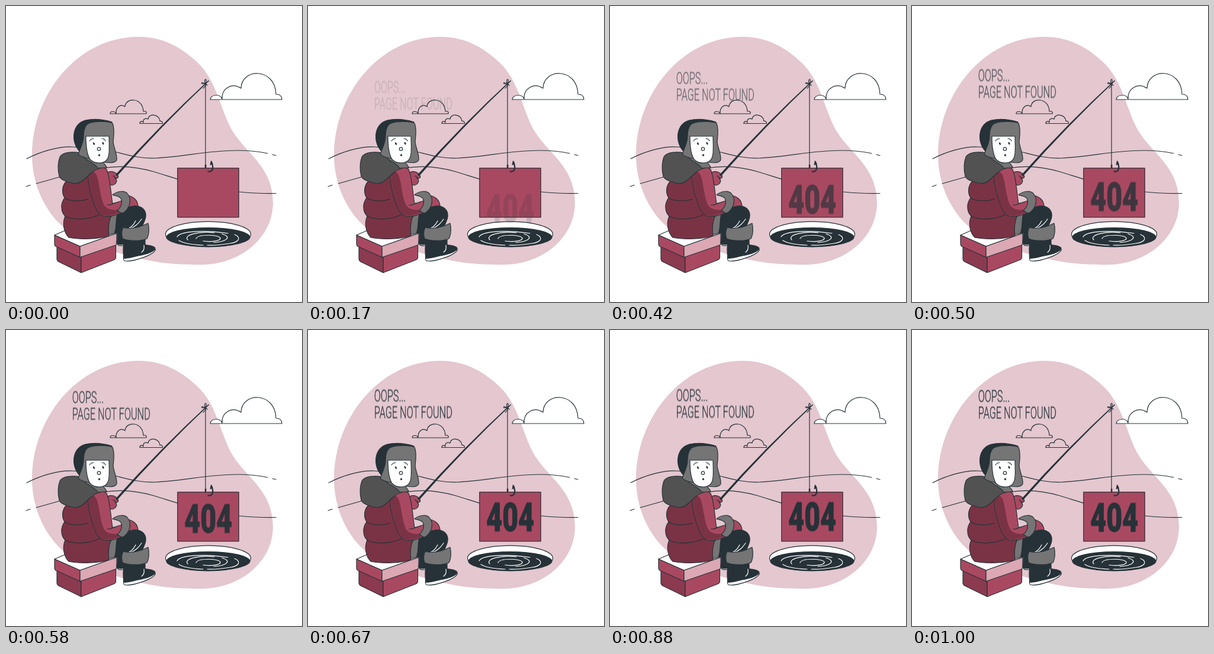
Recreate the animation shown at these times as an HTML page. Size 500 by 500 pixels, loop 1040 ms.

```html
<!DOCTYPE html>
<html lang="en">
<head>
<meta charset="utf-8">
<title>Page not found</title>
<style>
  html, body { margin: 0; width: 100%; height: 100%; overflow: hidden; background: #fff; }
  svg { display: block; width: 100%; height: 100%; }

  :root {
    --ink: #263238;
    --rose: #a94961;
    --wine: #7a3345;
    --blush: #e4c7cf;
    --grey: #757575;
  }

  .line { fill: none; stroke: var(--ink); stroke-width: 1.2; stroke-linecap: round; stroke-linejoin: round; }
  .shape { stroke: var(--ink); stroke-width: 1.2; stroke-linejoin: round; }
  .hook { stroke-width: 2.3; }
  .chalk { fill: none; stroke: #fff; stroke-width: 1.2; stroke-linecap: round; }
  .ink { fill: var(--ink); }
  .rose { fill: var(--rose); }
  .wine { fill: var(--wine); }
  .blush { fill: var(--blush); }
  .grey { fill: var(--grey); }
  .white { fill: #fff; }

  text { font-family: Roboto, "Liberation Sans", sans-serif; fill: var(--ink); stroke: var(--ink); }
  .message { font-size: 27.7px; font-weight: 300; stroke-width: .3; }
  .code { font-size: 67.5px; font-weight: 900; text-anchor: middle; stroke-width: 1; }

  .rise { animation: rise 1040ms infinite; }
  @keyframes rise {
    0% {
      opacity: 0;
      transform: translateY(29.9px);
      animation-timing-function: cubic-bezier(.345, .085, .499, 1.368);
    }
    92.3%, 100% { opacity: 1; transform: none; }
  }
</style>
</head>
<body>
<svg viewBox="0 0 500 500" role="img" aria-label="Ice fisher who has caught a 404 sign">
  <path class="blush" d="M224 52C268 52 300 73 324 96C354 125 360 165 378 203C400 247 451 268 451 332
    C451 392 395 437 330 437C285 437 255 434 225 426C170 412 120 400 85 362C57 330 44 290 44 252C44 150 120 52 224 52Z"/>

  <!-- hills -->
  <g class="line">
    <path d="M35 258C58 246 88 237 112 238C140 239 165 243 187 247C207 252 228 258 252 257C300 255 340 244 390 244C410 244 428 246 442 249M450 251L456 252.5"/>
    <path d="M34 305L41 302.5M51 300L90 289M164 274C196 268 226 273 250 280C290 292 335 309 394 314C415 316 436 317 456 316.5"/>
  </g>

  <!-- clouds -->
  <path class="shape white" d="M345 158C346 149 362 148 365 157C364 140 381 128 397 139C398 104 455 104 456 149C463 149 466 153 466 158Z"/>
  <g class="line">
    <path d="M176 182C176 177 184 177 186 182C185 172 193 164 201 170C202 154 231 154 232 178C236 177 238 179 237 182Z"/>
    <path d="M226 198.500C226 194 231 194 232 197C231 191 235 189 240 191C241 181 259 182 260 194.500C263 194 265 196 264.500 198.500Z"/>
  </g>

  <!-- ice hole -->
  <ellipse class="shape white" cx="341.500" cy="385.500" rx="72" ry="21.300"/>
  <ellipse class="ink" cx="341.500" cy="390.500" rx="71" ry="16.500"/>
  <g class="chalk">
    <path d="M289 390C293 382 325 377 375 384M386 386C398 391 394 399 378 401C367 403 354 404.500 340 404M333 404C311 403 298 400 292 396"/>
    <path d="M307 395C299 387 325 380 352 383M365 385C382 390 373 398 351 399.500"/>
    <path d="M321 393C324 385 360 386 362 392C363 397 346 399 333 397"/>
  </g>

  <!-- sign, line and hook -->
  <rect class="shape rose" x="289.800" y="273.800" width="103.400" height="83"/>
  <path class="line" d="M337 132V270"/>
  <path class="ink" d="M335.800 268H338.400V274H335.800Z"/>
  <path class="line hook" d="M347 263L348.500 268C351 276 347 281 341.500 279.500"/>
  <path class="ink" d="M346 261L350 267L344.500 269Z"/>

  <!-- box -->
  <path class="shape" fill="#8b3a50" d="M86 405L127 424V450.500L89 432Q86 430 86 427Z"/>
  <path class="shape rose" d="M127 423L185.500 401V425Q185 428 182 429L127 450.500Z"/>
  <path class="shape white" d="M82 387L125 406L187 384L130 366Z"/>
  <path class="shape rose" d="M82 387L125 406V424.500L84 406Q82 405 82 402Z"/>
  <path class="shape" fill="#dba8b4" d="M125 406L187 384V401Q187 403 185 404L125 424.500Z"/>

  <!-- far leg -->
  <path class="shape white" d="M187 400C189 406 195 406 202 403V397H187Z"/>
  <path class="ink" d="M188 374H204V402C196 404 189 404 187 401Z"/>

  <!-- far hand and rod -->
  <path class="shape rose" d="M172 281C178 278 185 280 189 286C191 290 188 292 184 291C189 294 187 301 179 303L171 300Z"/>
  <path class="ink" d="M185 285Q262 199 342 125.500L343.200 126.600Q264 201 187.500 287.500Z"/>
  <path class="line" d="M181 287L186 291"/>
  <path class="line" d="M336 131C329 127 328 133 336 131C334 121 341 122 337 131C339 134 335 137 333 139M337 131L340 134"/>

  <!-- legs -->
  <path class="shape rose" d="M203 320C213 320 223 327 223 339C218 346 208 348 200 347Z"/>
  <path class="ink" d="M184 356C188 348 202 338 219 337C234 338 239 349 236 359C233 368 230 374 226 379L198 382C193 382 188 384 183 384Z"/>
  <path class="chalk" d="M203 377C211 375 216 369 219 363M209 376C219 373 224 367 229 360"/>
  <path class="shape white" d="M199 418C198 425 198 429 200 430.500C213 433 250 421 252.500 411L240 407Z"/>
  <path class="shape ink" d="M200 390H235V403C240 405 249 404 252 409C251 416 234 420 223 422C214 424 205 427 199 426C197 413 198 402 200 390Z"/>
  <path class="chalk" d="M233 404C234 410 232 414 229 416"/>
  <path class="shape grey" d="M198 374C212 378 228 373 240 367C242 374 242 386 238 393C226 398 208 397 197 393C195 387 195 380 198 374Z"/>

  <!-- jacket -->
  <path class="shape grey" d="M170 362C176 356 183 352 188 351C185 362 187 376 183 384L171 387Z"/>
  <path class="shape wine" d="M102 296C94 304 94 316 99 324C92 333 92 347 100 355C95 366 97 382 106 391C125 395 158 394 174 388C172 377 174 364 177 355L164 280L140 276Z"/>
  <path class="line" d="M99 324C109 331 128 330 139 326M100 355C116 363 141 360 157 353"/>
  <path class="shape rose" d="M139 284C141 274 160 268 170 276C176 290 177 316 180 334C184 333 189 331 195 329L201 347C190 352 176 357 164 355C151 349 148 331 143 316C140 305 138 294 139 284Z"/>
  <path class="wine" d="M140 284C148 275 153 283 155 292C159 309 160 326 166 337C172 345 184 346 196 343L198 347C187 351 175 355 164 354C152 348 148 331 144 316C141 305 139 294 140 284Z"/>
  <path class="line" d="M171 336C175 337 179 335 182 333"/>
  <path class="shape grey" d="M180 319C188 312 201 311 206 318C213 328 209 343 197 350C192 349 190 347 188 345C195 340 197 331 194 325C190 320 184 321 180 319Z"/>

  <!-- hood -->
  <path class="shape" fill="#525252" d="M91 255C96 246 114 246 125 248C139 261 157 257 170 272C157 273 149 277 143 283C134 291 127 300 117 300C105 298 93 294 90 288C87 275 88 263 91 255Z"/>
  <path class="shape grey" d="M124 247C135 250 145 256 155 259C163 262 168 267 170 273L155 274C151 265 133 262 124 247Z"/>

  <!-- hat and face -->
  <path class="shape ink" d="M125 246C109 231 111 199 134 193C149 190 166 192 179 196L145 225Z"/>
  <path class="shape grey" d="M136 201C141 194 170 194 180 198C184 208 182 220 181 229C182 240 188 250 187 260C184 266 174 265 166 264L138 257C131 256 124 253 122 250C126 240 131 230 131 220C131 211 133 205 136 201Z"/>
  <path class="shape white" d="M135 220H174C174 235 176 249 172 257C167 268 149 267 142 259C136 250 135 234 135 220Z"/>
  <path class="line" d="M141 228C143 225 145 224 148 224M162 224C165 224 167 225 168 228"/>
  <ellipse class="ink" cx="148.500" cy="232.500" rx="1.300" ry="2.300" transform="rotate(-30 148.500 232.500)"/>
  <ellipse class="ink" cx="164" cy="232" rx="1.300" ry="2.300" transform="rotate(-30 164 232)"/>
  <circle class="shape white" cx="157" cy="241.500" r="2.700"/>
  <circle class="ink" cx="157.500" cy="252" r="1.700"/>

  <!-- rising text, set in a condensed cut -->
  <g class="rise">
    <g class="message" transform="translate(111.800 121.500) scale(.587 1)">
      <text>OOPS...</text>
      <text y="28">PAGE NOT FOUND</text>
    </g>
    <g class="code" transform="translate(341.700 340.500) scale(.69 1)">
      <text>404</text>
    </g>
  </g>
</svg>
</body>
</html>
```
